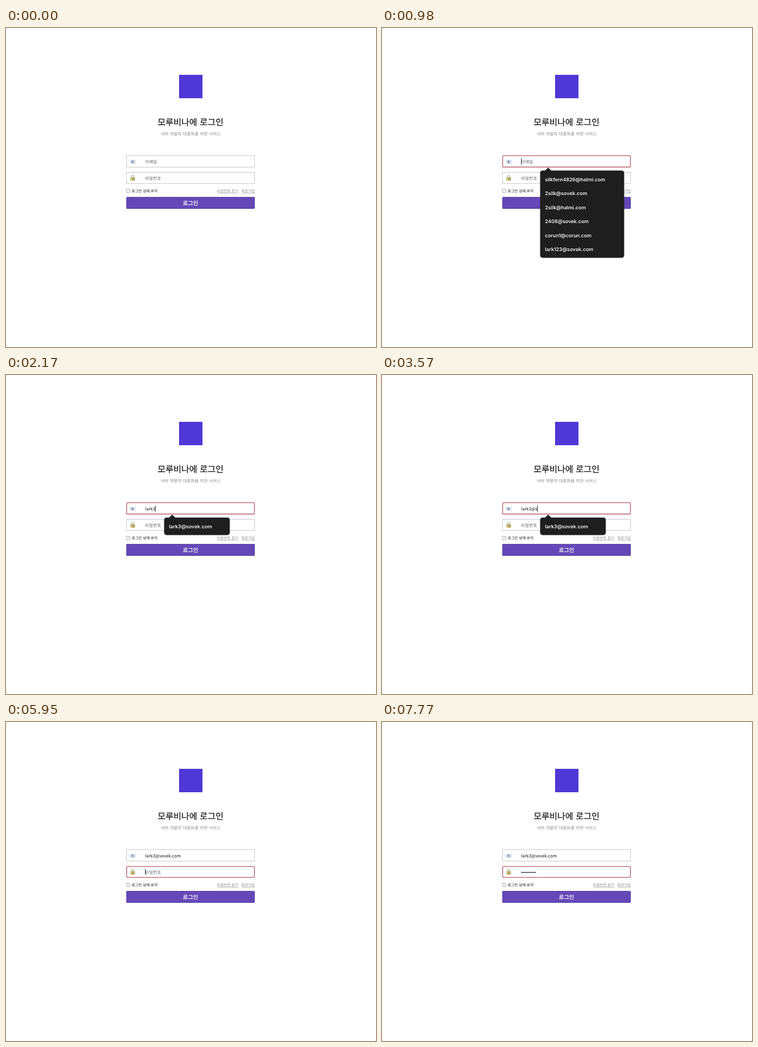
Write an HTML page that moves like this. It is 806x695 px and loops after 8000 ms.

```html
<!DOCTYPE html>
<html lang="ko">
<head>
<meta charset="utf-8">
<title>로그인</title>
<style>
html, body { margin: 0; width: 100%; height: 100%; overflow: hidden; background: #666; }
svg { display: block; }
text { font: 9.4px "Noto Sans CJK KR", "Noto Sans KR", "Noto Sans CJK JP", sans-serif; fill: #111; text-rendering: geometricPrecision; white-space: pre; }
.mid { text-anchor: middle; }
.title { font-size: 18.8px; fill: #222; stroke: #222; stroke-width: .35; }
.sub { fill: #8c8c8c; }
.small { font-size: 8.06px; }
.link { font-size: 8.06px; fill: #8c8c8c; text-decoration: underline; }
.btn { font-size: 12.1px; font-weight: 500; fill: #fff; stroke: #fff; stroke-width: .3; }
.hint { fill: #666; }
.field { fill: #fff; stroke: #bbb; stroke-width: 1; }
.field.on { stroke: #b75a66; stroke-width: 1.6; }
#popup { filter: drop-shadow(0 .6px 1px rgba(0,0,0,.5)); }
#popup text { font: 600 10.75px Inter, sans-serif; fill: #f0f0f0; }
</style>
</head>
<body>
<svg width="806" height="695" viewBox="0 0 806 695">
  <rect width="806" height="695" rx="2" fill="#fff"/>
  <rect x="377" y="102" width="51" height="51" fill="#4f38d6"/>
  <text class="mid title" x="402" y="211.5">모루비나에 로그인</text>
  <text class="mid sub" x="402.3" y="234.3">서버 개발의 대중화를 위한 서비스</text>

  <rect id="mailBox" class="field"/>
  <rect id="passBox" class="field"/>

  <g>
    <rect x="269.3" y="287.3" width="13.2" height="8.6" rx=".8" fill="#e1e5eb"/>
    <path d="M269.6 295.6l4.6-4.4M282.2 295.6l-4.6-4.4M269.6 287.6l6.3 4.6 6.3-4.6" fill="none" stroke="#c3c9d2" stroke-width=".6"/>
    <rect x="273.5" y="288.6" width="4.8" height="6" rx="2" fill="#9db4d3"/>
    <path d="M277.1 289.9h-2.2v3.4h2.2M274.9 291.6h1.9" fill="none" stroke="#5f7fae" stroke-width=".8"/>
  </g>
  <g>
    <path d="M273.2 326v-2a2.8 2.8 0 0 1 5.6 0v2" fill="none" stroke="#b0b5b5" stroke-width="1.4"/>
    <rect x="271.2" y="324.8" width="9.8" height="7.6" rx="1" fill="#bdae6c"/>
    <path d="M271.6 327.2h9M271.6 329.2h9M271.6 331.1h9" stroke="#a39553" stroke-width=".5"/>
    <rect x="271.6" y="325.2" width="2.6" height="6.8" fill="#d9cd96" opacity=".7"/>
  </g>

  <text id="mail" x="303" y="295"></text>
  <text id="passHint" class="hint" x="303" y="330.5">비밀번호</text>
  <g id="dots"></g>
  <rect id="caret" width="1" fill="#000"/>

  <rect x="262.6" y="351.4" width="7.4" height="7.2" rx="1.3" fill="#fff" stroke="#767676" stroke-width=".8"/>
  <text class="small" x="273.8" y="358.4">로그인 상태 유지</text>
  <text class="link" x="459.5" y="358.4">비밀번호 찾기</text>
  <text class="link" x="512.6" y="358.4">회원가입</text>
  <rect x="262.5" y="368.5" width="279" height="25" rx="1" fill="#6448b8" stroke="#54439a"/>
  <text class="mid btn" x="402" y="386">로그인</text>

  <g id="popup">
    <path d="M354.5 311.8L361 305.2Q362 304.2 363 305.2L369.5 311.8Z" fill="#1e1e1e"/>
    <rect id="panel" x="344.7" y="310.8" rx="5" fill="#1e1e1e"/>
    <g id="rows"></g>
  </g>
</svg>
<script>
const $ = id => document.getElementById(id);
const LOOP = 8000, LEFT = 303, DOT = 3.24, ROW = 30.4;
const address = "lark3@sovek.com";
const keys = [1470, 1680, 1820, 1960, 2170, 3220, 3570, 3780, 3920, 3990, 4130, 4270, 4340, 4480, 4620];
const dotKeys = Array.from({length: 9}, (_, i) => Math.round((6020 + i * 910 / 8) / 70) * 70).concat(7210);
const caretOn = [[980, 2730], [3220, 5390], [5950, 7770]];
const menus = [
  {from: 980, to: 1470, width: 182, items: ["silkfern4826@halmi.com", "2silk@sovek.com", "2silk@halmi.com", "2408@sovek.com", "corun1@corun.com", "lark123@sovek.com"]},
  {from: 1470, to: 2170, width: 152, items: ["lark123@sovek.com", "lark", "lark@sovek.com", "lark123@halmi.com", "lark1@sovek.co", address]},
  {from: 2170, to: 4690, width: 142, items: [address]}
];

const show = (el, on) => el.setAttribute("visibility", on ? "visible" : "hidden");
const set = (el, attrs) => { for (const k in attrs) el.setAttribute(k, attrs[k]); };
const count = (times, t) => times.filter(k => k <= t).length;

$("dots").innerHTML = dotKeys.map((_, i) =>
  `<circle cx="${LEFT + DOT * (i + .5)}" cy="327.8" r="1.2" fill="#111"/>`).join("");

// The border stays inside the box whatever its width.
function drawField(el, top, height, on) {
  const inset = on ? .8 : .5;
  el.classList.toggle("on", on);
  set(el, {x: 262 + inset, y: top + inset, width: 280 - 2 * inset, height: height - 2 * inset, rx: on ? 2 : 0});
}

let shown;
function drawMenu(menu) {
  if (menu === shown) return;
  shown = menu;
  show($("popup"), menu);
  if (!menu) return;
  set($("panel"), {width: menu.width + .6, height: 37.7 + ROW * (menu.items.length - 1)});
  $("rows").innerHTML = menu.items.map((s, i) => `<text x="355" y="${334 + ROW * i}">${s}</text>`).join("");
}

function draw(t) {
  const typed = address.slice(0, count(keys, t));
  const dots = count(dotKeys, t);
  const inPass = t >= 4900;

  drawField($("mailBox"), 277.5, 26.2, t >= 980 && !inPass);
  drawField($("passBox"), 313.9, 25.4, inPass);
  $("mail").textContent = typed || "이메일";
  $("mail").classList.toggle("hint", !typed);
  show($("passHint"), !dots);
  [...$("dots").children].forEach((dot, i) => show(dot, i < dots));

  const width = inPass ? dots * DOT : typed ? $("mail").getComputedTextLength() : 0;
  set($("caret"), {x: Math.round(LEFT + width), y: inPass ? 320 : 284, height: inPass ? 13 : 14});
  show($("caret"), caretOn.some(([a, b]) => t >= a && t < b));

  drawMenu(menus.find(m => t >= m.from && t < m.to) || null);
}

function tick() {
  draw(performance.now() % LOOP);
  requestAnimationFrame(tick);
}
tick();
</script>
</body>
</html>
```
